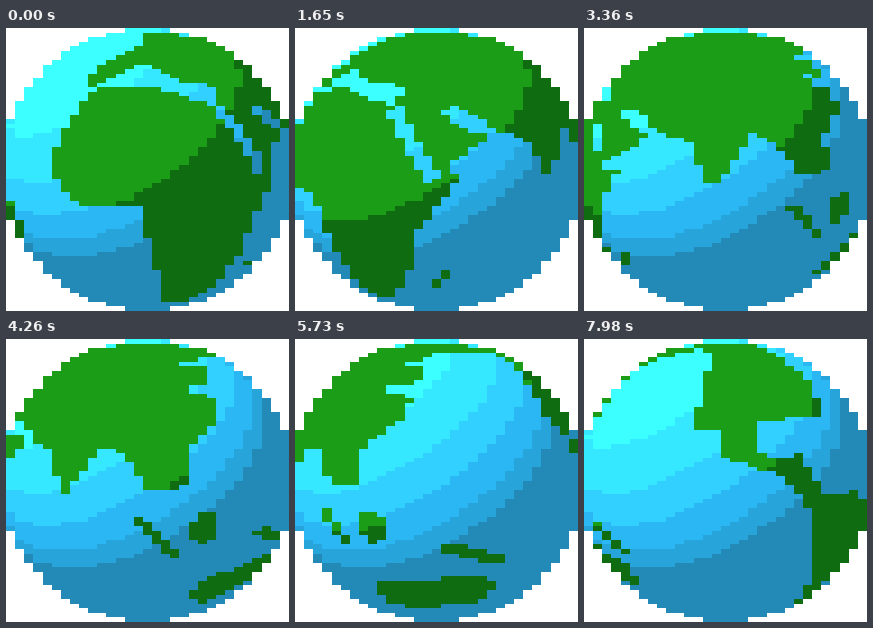
An HTML page with a canvas for the animation above (8000 ms loop, 283x283 px).

```html
<!DOCTYPE html>
<html lang="en">
<head>
<meta charset="utf-8">
<title>Pixel globe</title>
<style>
html, body { margin: 0; width: 100%; height: 100%; overflow: hidden; background: #fff; }
canvas { display: block; width: 100vw; height: 100vh; image-rendering: pixelated; }
</style>
</head>
<body>
<canvas id="globe" width="283" height="283"></canvas>
<script>
const SIZE = 283, COLS = 31, ROWS = 62;
const LOOP = 8000, STEP = 30;
const START_LON = 11, SPEED = 21;       // degrees, degrees per second
const TILT = 13.5 * Math.PI / 180;
const CAMERA = 2.2;                     // distance in globe radii
const LIGHT = [-0.432, 0.647, 0.628];
const DEG = 180 / Math.PI;

// Key points of the large coastlines: lon, lat
const africa = [[-6, 35], [11, 36], [32, 30], [51, 11], [41, -2], [40, -12], [33, -27], [26, -34],
  [18, -34], [9, 4], [-8, 4], [-17, 14], [-11, 28]];
const eurasia = [[-9, 37], [-9, 43], [8, 55], [10, 64], [160, 64], [160, 58], [127, 54], [122, 30],
  [111, 21], [110, 12], [101, 11], [95, 19], [89, 23], [78, 8], [72, 20], [57, 25], [59, 21],
  [44, 12], [32, 29], [36, 36], [22, 38], [9, 44], [-5, 36]];
const americas = [[158, 64], [158, 60], [172, 56], [170, 27], [178, 26], [178, 19], [192, 15],
  [200, 7], [201, -2], [206, -16], [206, -48], [218, -33], [236, -6], [222, 7], [206, 8],
  [199, 20], [194, 18], [187, 21], [188, 29], [210, 30], [215, 44], [201, 63]];
const continents = [africa, eurasia, americas];

// Islands and seas are thick strokes: from, to, radius
const stroke = (x1, y1, x2, y2, r) => ({ x1, y1, x2, y2, r });
const islands = [
  stroke(120, -22, 142, -20, 6.5),
  stroke(134, -4, 148, -9, 1.5),
  stroke(99, 3, 107, -6, 1.3),
  stroke(115, -1, 115, 2, 3.2),
  stroke(45, -23, 49, -16, 1.2),
  stroke(-38, -7, -52, -26, 6)
];
const seas = [
  stroke(34, 28, 44, 12, 1.9),
  stroke(50, 28, 58, 24, 2),
  stroke(115, 39, 126, 38, 2),
  stroke(117, 50, 128, 50, 1.3)
];

const WATER = [
  [0.86, '#3cffff'], [0.72, '#36e8ff'], [0.6, '#32d0ff'], [0.485, '#2bb7f3'],
  [0.4, '#27a5da'], [-2, '#238ab8']
];
const LIT = '#1c9d18', SHADED = '#106c10', LAND_EDGE = 0.57;

const inside = (points, x, y) => points.reduce((hit, [xa, ya], i) => {
  const [xb, yb] = points[(i + 1) % points.length];
  const crosses = (ya > y) !== (yb > y) && x < (xb - xa) * (y - ya) / (yb - ya) + xa;
  return crosses ? !hit : hit;
}, false);

function covers({ x1, y1, x2, y2, r }, x, y) {
  const dx = x2 - x1, dy = y2 - y1;
  const k = ((x - x1) * dx + (y - y1) * dy) / (dx * dx + dy * dy);
  const t = Math.min(1, Math.max(0, k));
  return Math.hypot(x - x1 - t * dx, y - y1 - t * dy) < r;
}

const isLand = (lon, lat) =>
  islands.some(s => covers(s, lon, lat)) ||
  continents.some(p => inside(p, lon, lat)) && !seas.some(s => covers(s, lon, lat));

// Where the ray through a point on the disc meets the unit sphere
function surface(u, v) {
  const reach = CAMERA * CAMERA - 1, k = 1 / Math.sqrt(reach);
  const q = (u * u + v * v) * k * k;
  const s = (CAMERA - Math.sqrt(Math.max(0, 1 - q * reach))) / (1 + q);
  return [u * k * s, v * k * s, CAMERA - s];
}

const edge = (i, n) => Math.round(i * SIZE / n);

function makeCells() {
  const cells = [], mid = SIZE / 2;
  for (let r = 0; r < ROWS; r++) {
    for (let c = 0; c < COLS; c++) {
      const u = ((c + 0.5) * SIZE / COLS - mid) / 146;
      const v = (mid - (r + 0.5) * SIZE / ROWS) / mid;
      if (u * u + v * v > 1) continue;
      const [x, y, z] = surface(u, v);
      const glow = x * LIGHT[0] + y * LIGHT[1] + z * LIGHT[2];
      const left = edge(c, COLS), top = edge(r, ROWS);
      cells.push({
        left, top, w: edge(c + 1, COLS) - left, h: edge(r + 1, ROWS) - top,
        lat: Math.asin(y * Math.cos(TILT) + z * Math.sin(TILT)) * DEG,
        lon: Math.atan2(x, z * Math.cos(TILT) - y * Math.sin(TILT)) * DEG,
        water: WATER.find(([min]) => glow > min)[1],
        land: glow > LAND_EDGE ? LIT : SHADED,
        polar: r === 0
      });
    }
  }
  return cells;
}

const ctx = document.getElementById('globe').getContext('2d');
const cells = makeCells();

function draw(ms) {
  const spin = START_LON + SPEED * ms / 1000;
  ctx.clearRect(0, 0, SIZE, SIZE);
  for (const cell of cells) {
    const dry = !cell.polar && isLand(cell.lon + spin, cell.lat);
    ctx.fillStyle = dry ? cell.land : cell.water;
    ctx.fillRect(cell.left, cell.top, cell.w, cell.h);
  }
}

let shown = -1;
const began = performance.now();
function tick() {
  const ms = (performance.now() - began) % LOOP;
  const step = Math.floor(ms / STEP);
  if (step !== shown) draw((shown = step) * STEP);
  requestAnimationFrame(tick);
}
tick();
</script>
</body>
</html>
```
